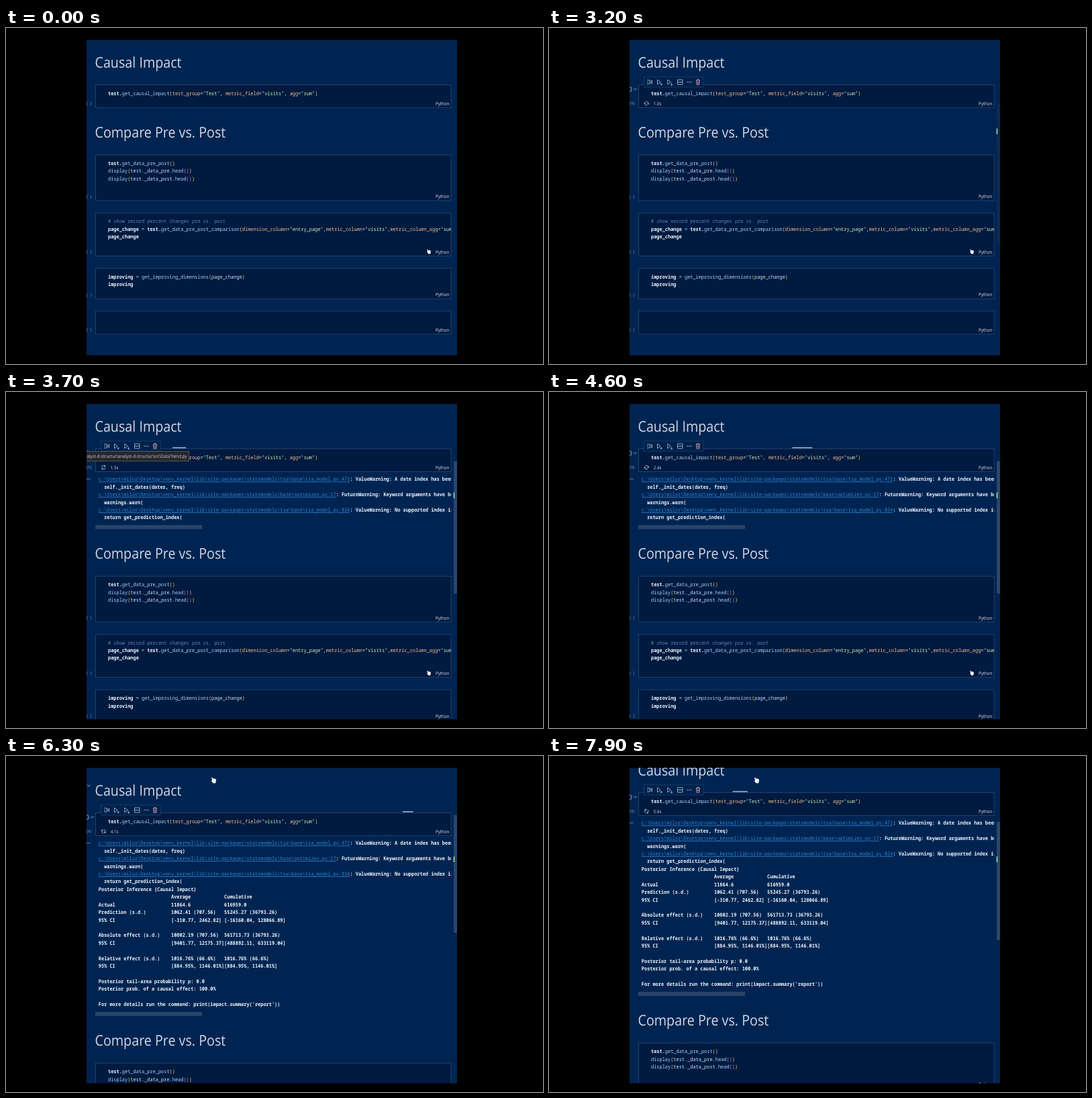
These frames come from a looping animation (800x500 px, 8000 ms). An HTML page:

```html
<!DOCTYPE html>
<html lang="en">
<head>
<meta charset="utf-8">
<title>Notebook run</title>
<style>
html, body { margin: 0; width: 100%; height: 100%; overflow: hidden; background: #000; }
svg { display: block; width: 800px; height: 500px; }
text { white-space: pre; text-rendering: geometricPrecision; }
.code { font: 500 6.944px "Noto Sans Mono", "DejaVu Sans Mono", monospace; }
.ui { font: 400 6.2px "Open Sans", "Noto Sans", sans-serif; }
.head { font: 400 19.7px "Open Sans", "Noto Sans", sans-serif; }
.bold { font-weight: 600; }
.icon { fill: none; stroke: #b9c6da; stroke-width: .8; }
</style>
</head>
<body>
<svg viewBox="0 0 800 500">
  <defs>
    <clipPath id="panel"><rect x="120" y="17.5" width="552" height="469.5"/></clipPath>
    <clipPath id="column"><rect x="120" y="-100" width="543.2" height="900"/></clipPath>
    <path id="hand" d="M-3.4 -3.6 Q-2.6 -5 -1.7 -3.6 L-.9 -1.4 Q-.2 -3.6 .7 -2.2 Q1.7 -3.2 2.2 -1.8 Q3.5 -2 3.5 -.2 L3.2 2.6 L2.5 4.6 L-.8 4.6 Q-2 2.8 -3.6 1.2 Q-3.5 -.1 -2.3 .4Z" fill="#f0f2f5"/>
  </defs>
  <g clip-path="url(#panel)">
    <rect x="120" y="17.5" width="552" height="469.5" fill="#002451"/>
    <g id="page"></g>
    <g id="over"></g>
  </g>
</svg>
<script>
const NS = "http://www.w3.org/2000/svg";
const ASPECT = 10 / 9;      // 16:9 screen shown on a 16:10 stage
const LOOP = 8000, PITCH = 11.43;
const RUN = 2200, BAR = 2796, WARN = 3400, REPORT = 5900, SCROLL = 7700;
const INK = {
  w: "#eef3fa", v: "#cfe0f5", f: "#b0d0f8", o: "#f5bd88", s: "#d3efb0",
  c: "#6582b2", y: "#f5d648", p: "#d07dd6", e: "#b2e8f0", l: "#2f86d6"
};

const $ = id => document.getElementById(id);

function add(parent, tag, attrs = {}) {
  const el = document.createElementNS(NS, tag);
  for (const k in attrs) el.setAttribute(k, attrs[k]);
  parent.appendChild(el);
  return el;
}
const group = (parent, attrs) => add(parent, "g", attrs);
const rect = (parent, x, y, width, height, fill, more = {}) =>
  add(parent, "rect", { x, y, width, height, fill, ...more });
const icon = (parent, d, more = {}) => add(parent, "path", { d, class: "icon", ...more });

function label(parent, cls, x, y, str, fill, more = {}) {
  const el = add(parent, "text", {
    class: cls, fill, transform: `translate(${x} ${y}) scale(1 ${ASPECT})`, ...more
  });
  el.textContent = str;
  return el;
}

// Each part is a colour key followed by its text.
function code(parent, x, y, ...parts) {
  const el = label(parent, "code", x, y, "", INK.w);
  for (const part of parts) {
    const key = part[0];
    const span = add(el, "tspan", { fill: INK[key] });
    if (key === "w") span.setAttribute("class", "bold");
    if (key === "l") span.setAttribute("text-decoration", "underline");
    span.textContent = part.slice(1);
  }
}

function cell(parent, top, bottom, lines = [], first = top + 15.3) {
  rect(parent, 133.5, top, 529.5, bottom - top, "#001a40", { stroke: "#244470", "stroke-width": .9 });
  const clip = group(parent, { "clip-path": "url(#column)" });
  lines.forEach((parts, i) => code(clip, 152, first + i * PITCH, ...parts));
  label(parent, "ui", 640, bottom - 3.6, "Python", "#dfe6ef");
  return label(parent, "code", 119.3, bottom - 4.2, "[ ]", "#8aa3c4", { style: "font-size:5px" });
}

// Page content
const page = $("page"), over = $("over");
label(page, "head", 132.5, 58.6, "Causal Impact", "#d0d8e4");
const count = cell(page, 84.5, 118.5, [[
  "wtest.", "fget_causal_impact", "y(", "otest_group", "e=", 's"Test"', "v, ",
  "ometric_field", "e=", 's"visits"', "v, ", "oagg", "e=", 's"sum"', "y)"
]]);

const bar = rect(page, 0, 82.2, 10, 1.4, "#a9c4e6");

const inserts = group(page);
for (const [x, str] of [[351, "Code"], [390, "Markdown"]]) {
  icon(inserts, `M${x} 70.4h6M${x + 3} 67.2v6.4`, { style: "stroke:#5d7aa6" });
  label(inserts, "ui", x + 9, 72.8, str, "#5d7aa6");
}

const chevron = icon(page, "M121 42.6 l2.3 2.6 l2.3 -2.6");

const runBox = group(page);
const hover = rect(runBox, 120, 84.5, 12.5, 13, "#253d63");
const play = icon(runBox, "M118 87.8 L123 91 L118 94.2Z");
const stop = rect(runBox, 117, 88.2, 5.8, 6, "none", { class: "icon", rx: 1 });
icon(runBox, "M126.3 89.8 l2.2 2.4 l2.2 -2.4");

const click = group(page);
add(click, "circle", { cx: 121, cy: 100.6, r: 3.2, fill: "#5d1626", stroke: "#d3202c", "stroke-width": 1.5 });

const tools = group(page);
rect(tools, 141.5, 73, 88.5, 15, "#00214b", { stroke: "#1f3f6b", "stroke-width": .8 });
icon(tools, "M146 77.6h3M146 80.4h2M146 83.2h3M150 77.4v6M150 77.6l3.2 2.8l-3.2 2.8M153.4 77.4v6");
icon(tools, "M161.5 77v7l4.6 -3.5zM165.6 83.8h3.2M167.2 82v3.4");
icon(tools, "M176.8 77v7l4.6 -3.5zM182.6 81.6v3.6M181 83.8l1.6 1.6l1.6 -1.6");
icon(tools, "M191.6 77h7.4v7h-7.4zM191.6 80.5h7.4");
for (const x of [206.2, 209, 211.8])
  add(tools, "circle", { cx: x, cy: 80.6, r: .75, fill: "#b9c6da" });
icon(tools, "M218.8 78h6.4M220.8 78v-1.4h2.4v1.4M219.6 78l.4 6.4h4l.4 -6.4M221.2 79.6v3.4M222.8 79.6v3.4", { style: "stroke:#d9a7b7" });

const status = group(page);
const spin = icon(status, "M-2.6 -.9 A2.7 2.7 0 0 1 2.5 -1 M2.6 .9 A2.7 2.7 0 0 1 -2.5 1 M2.7 -2.9v2h-2 M-2.7 2.9v-2h2");
const timer = label(status, "ui", 155.8, 114.8, "", "#d3dbe7");

// Cell output
const libs = "c:\\Users\\milor\\Desktop\\venv_kernel\\lib\\site-packages\\statsmodels\\";
const row = (a, b, c) => a.padEnd(26) + b.padEnd(19) + c;
const warnings = [
  ["l" + libs + "tsa\\base\\tsa_model.py:471", "w: ValueWarning: A date index has been provided"],
  ["w  self._init_dates(dates, freq)"],
  ["l" + libs + "base\\optimizer.py:17", "w: FutureWarning: Keyword arguments have been passed"],
  ["w  warnings.warn("],
  ["l" + libs + "tsa\\base\\tsa_model.py:834", "w: ValueWarning: No supported index is available"],
  ["w  return get_prediction_index("]
];
const report = [
  "Posterior Inference {Causal Impact}",
  row("", "Average", "Cumulative"),
  row("Actual", "11864.6", "616959.0"),
  row("Prediction (s.d.)", "1062.41 (707.56)", "55245.27 (36793.26)"),
  row("95% CI", "[-310.77, 2462.82]", "[-16160.04, 128066.89]"),
  "",
  row("Absolute effect (s.d.)", "10802.19 (707.56)", "561713.73 (36793.26)"),
  row("95% CI", "[9401.77, 12175.37]", "[488892.11, 633119.04]"),
  "",
  row("Relative effect (s.d.)", "1016.76% (66.6%)", "1016.76% (66.6%)"),
  row("95% CI", "[884.95%, 1146.01%]", "[884.95%, 1146.01%]"),
  "",
  "Posterior tail-area probability p: 0.0",
  "Posterior prob. of a causal effect: 100.0%",
  "",
  "For more details run the command: print(impact.summary('report'))"
];
const warnBox = group(page, { "clip-path": "url(#column)" });
const reportBox = group(page, { "clip-path": "url(#column)" });
warnings.forEach((parts, i) => code(warnBox, 137.8, 132.3 + i * PITCH, ...parts));
report.forEach((str, i) => code(reportBox, 137.8, 132.3 + (i + warnings.length) * PITCH, "w" + str));
for (const x of [121, 123, 125])
  add(warnBox, "circle", { cx: x, cy: 129.6, r: .6, fill: "#b9c6da" });
const slider = rect(warnBox, 133, 198, 159, 6, "#2a4469");

// Cells that move down as the output grows
const lower = group(page);
label(lower, "head", 132.5, 162.8, "Compare Pre vs. Post", "#d0d8e4");
cell(lower, 188.8, 256.8, [
  ["wtest.", "fget_data_pre_post", "y()"],
  ["fdisplay", "y(", "vtest._data_pre.", "fhead", "p()", "y)"],
  ["fdisplay", "y(", "vtest._data_post.", "fhead", "p()", "y)"]
], 203.8);
cell(lower, 275.4, 339.2, [
  ["c# show record percent changes pre vs. post"],
  ["wpage_change ", "e= ", "wtest.", "fget_data_pre_post_comparison", "y(", "odimension_column", "e=",
    's"entry_page"', "v,", "ometric_column", "e=", 's"visits"', "v,", "ometric_column_agg", "e=", 's"sum"', "y)"],
  ["wpage_change"]
], 290.2);
add(lower, "use", { href: "#hand", transform: "translate(630 332.6) scale(.8)" });
cell(lower, 357.6, 403, [
  ["wimproving ", "e= ", "fget_improving_dimensions", "y(", "vpage_change", "y)"],
  ["wimproving"]
], 372.8);
cell(lower, 421.2, 455.6);

// Fixed layer
const thumb = rect(over, 667, 0, 5, 10, "#2b466c");
const mark = rect(over, 666.6, 149.5, 1.7, 8.5, "#93d6a0");
const tip = group(over);
rect(tip, 119, 88.3, 153.6, 14.6, "#25272d", { stroke: "#67625f", "stroke-width": .8 });
label(tip, "ui", 269.4, 97.8, "analyst-d-structur\\analyst-d-structur\\src\\DataTrend.py", "#cfd2d6", { "text-anchor": "end" });
const cursor = add(over, "use", { href: "#hand" });

const show = (el, on) => el.setAttribute("display", on ? "inline" : "none");
const ramp = (t, a, b) => Math.min(1, Math.max(0, (t - a) / (b - a)));
const ease = k => k * k * (3 - 2 * k);

function moveBar(t) {
  show(bar, t >= BAR);
  const p = Math.max(0, t - BAR) % 4000 / 4000;
  const unit = 10.6;
  const shift = p < .5 ? 50 * p : 25 + 49 * (p - .5);
  const width = unit * (3 - 4 * Math.abs(p - .5));
  bar.setAttribute("x", 133 + unit * (shift + .5) - width / 2);
  bar.setAttribute("width", width);
}

function moveThumb(t) {
  const [a, b] = t < WARN ? [112, 321] : t < REPORT ? [103, 300] : t < SCROLL ? [88, 263] : [98, 274];
  thumb.setAttribute("y", a);
  thumb.setAttribute("height", b - a);
  thumb.setAttribute("opacity", t < WARN ? 1 - .8 * ramp(t, 2400, 3000) : 1);
  show(thumb, t >= 1400);
}

function moveCursor(t) {
  const a = ease(ramp(t, 4900, 5200)), b = ease(ramp(t, 5700, 6000));
  const x = 116 + 168.5 * a + 25 * b, y = 91 - 35 * a - 20 * b;
  cursor.setAttribute("transform", `translate(${x} ${y})`);
  show(cursor, t >= 4900);
}

function draw(t) {
  const running = t >= RUN;
  page.setAttribute("transform", `translate(0 ${t >= SCROLL ? -30 : 0})`);
  const extra = t >= REPORT ? report.length * PITCH : 0;
  lower.setAttribute("transform", `translate(0 ${t >= WARN ? 85.4 + extra : 0})`);
  slider.setAttribute("y", 198 + extra);
  show(warnBox, t >= WARN);
  show(reportBox, t >= REPORT);

  show(runBox, t >= 1500);
  show(hover, !running);
  show(play, !running);
  show(stop, running);
  show(click, t >= 1800 && t < 2300);
  show(tools, running);
  show(status, running);
  show(mark, running);
  count.textContent = running ? "[9]" : "[ ]";
  const tenths = Math.floor(Math.max(0, t - RUN) * .00996 + .2);
  timer.textContent = (tenths / 10).toFixed(1) + "s";
  spin.setAttribute("transform", `translate(145.3 112.2) rotate(${Math.floor(t / 50) * 12 % 360})`);

  show(tip, t >= 3500 && t < 4000);
  show(chevron, t >= 5000);
  show(inserts, t >= 5000 && t < 5800);
  moveBar(t);
  moveThumb(t);
  moveCursor(t);
}

const start = performance.now();
function tick() {
  draw((performance.now() - start) % LOOP);
  requestAnimationFrame(tick);
}
tick();
</script>
</body>
</html>
```
